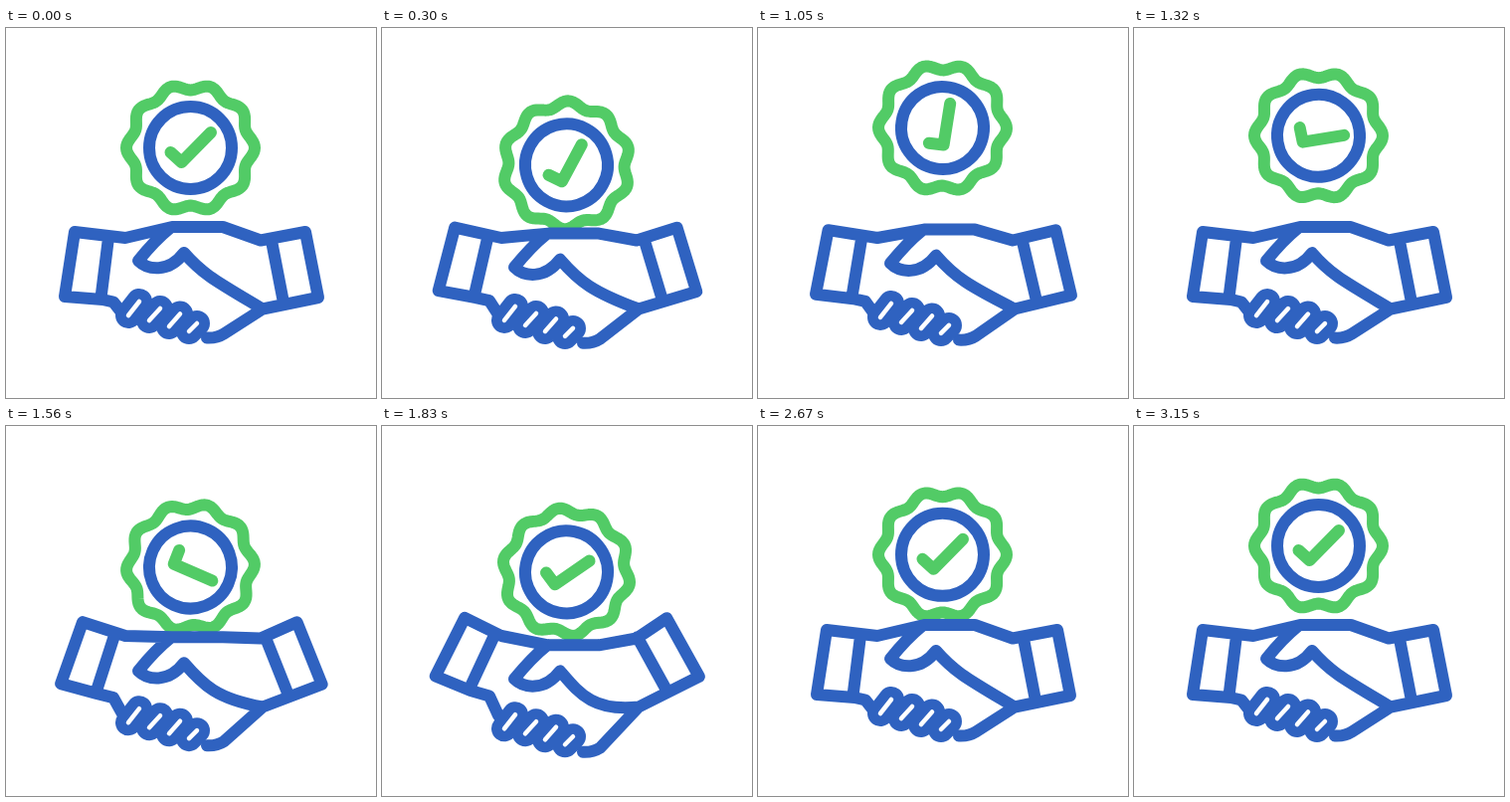
An HTML page that plays this animation: 372 px wide and 372 px high, repeating every 3.6 s.

```html
<!DOCTYPE html>
<html>
<head>
<meta charset="utf-8">
<style>
  html, body { margin: 0; width: 100%; height: 100%; overflow: hidden; background: #fff; }
  svg { display: block; width: 100vw; height: 100vh; }
  path, circle { fill: none; stroke: #2f62c0; stroke-width: 12; stroke-linecap: round; stroke-linejoin: round; }
  .green { stroke: #52cb66; }
  #fingers { stroke-width: 26; }
  #gaps { stroke: #fff; stroke-width: 4.5; }
</style>
</head>
<body>
<svg viewBox="0 0 372 372">
  <g id="badge">
    <path id="rosette" class="green"/>
    <circle r="41.5"/>
    <path class="green" d="M-20,4.5L-9,14.5L20.5,-15.5"/>
  </g>
  <path id="hands"/>
  <path id="fingers"/>
  <path id="gaps"/>
</svg>
<script>
const LOOP = 3600, STEP = 30, LAST = 3150;
const $ = id => document.getElementById(id);

// Keys: [time, value, skew of the ease leading to it]
const HEIGHT = [[0, 120.5], [540, 150], [1100, 99.5], [1720, 155, 1.3], [2120, 108.5], [2590, 129.8], [3150, 120.5]];
const TILT = [[0, 0], [850, -59], [1560, 69], [2100, -47], [2670, 0]];
const PRESS = [[0, 0], [150, 0], [540, 20.5], [1250, 0, .8], [1720, 25, 1.7], [2250, 0, .8]];

function track(keys, t) {
  const i = keys.findIndex(k => k[0] > t);
  if (i < 0) return keys[keys.length - 1][1];
  const [t0, v0] = keys[i - 1], [t1, v1, skew = 1] = keys[i];
  const u = ((t - t0) / (t1 - t0)) ** skew;
  return v0 + (v1 - v0) * (1 - Math.cos(Math.PI * u)) / 2;
}

function rosette() {
  const points = [];
  for (let a = 0; a < 360; a += 2) {
    const f = a * Math.PI / 180, r = 61.3 + 3.2 * Math.cos(10 * f);
    points.push((r * Math.cos(f)).toFixed(2) + ',' + (r * Math.sin(f)).toFixed(2));
  }
  return 'M' + points.join('L') + 'Z';
}

const turn = (cx, cy, deg) => {
  const c = Math.cos(deg * Math.PI / 180), s = Math.sin(deg * Math.PI / 180);
  return (x, y) => [cx + (x - cx) * c - (y - cy) * s, cy + (x - cx) * s + (y - cy) * c];
};

// The cuffs swing around the wrists while the middle sinks by d
function drawHands(d) {
  const left = turn(115, 244, .88 * d), right = turn(256, 246, -.88 * d);
  const down = (x, y, k = 1) => [x, y + k * d];
  $('hands').setAttribute('d', `
    M${down(117, 287, .2)} L${down(108, 275.5, -.2)} L${left(97, 273)} L${left(59, 270)} L${left(69, 205)}
    L120,211 L${down(167, 200)} L${down(218, 200)} L256,213.5
    L${right(301, 205)} L${right(314, 271)} L258,282.5
    L${down(219, 307.5, .8)} Q${down(212, 312, .8)} ${down(202, 311.5, .8)}
    M${left(103, 211)} L${left(95.5, 271)}
    M${right(267, 214)} L${right(279, 276)}
    M${down(165, 201)} Q${down(150, 213)} ${down(133, 234)}
    C${down(142, 243)} ${down(163, 247)} ${down(179, 226)}
    C${down(198, 248)} ${down(212, 255, 1.6)} 258,282.5`);
  const fingers = [[123, 289, 134, 275], [144, 294, 155, 282], [164, 300, 175, 287.5], [184, 305, 192, 297]]
    .map(([x, y, x2, y2]) => `M${down(x, y, .75)}L${down(x2, y2, .75)}`).join('');
  $('fingers').setAttribute('d', fingers);
  $('gaps').setAttribute('d', fingers);
}

function draw(now) {
  const t = Math.min(LAST, Math.floor(now % LOOP / STEP) * STEP);
  $('badge').setAttribute('transform',
    `translate(185.5 ${track(HEIGHT, t)}) rotate(${track(TILT, t)})`);
  drawHands(track(PRESS, t));
}

$('rosette').setAttribute('d', rosette());
const start = performance.now();
function loop() {
  draw(performance.now() - start);
  requestAnimationFrame(loop);
}
loop();
</script>
</body>
</html>
```
